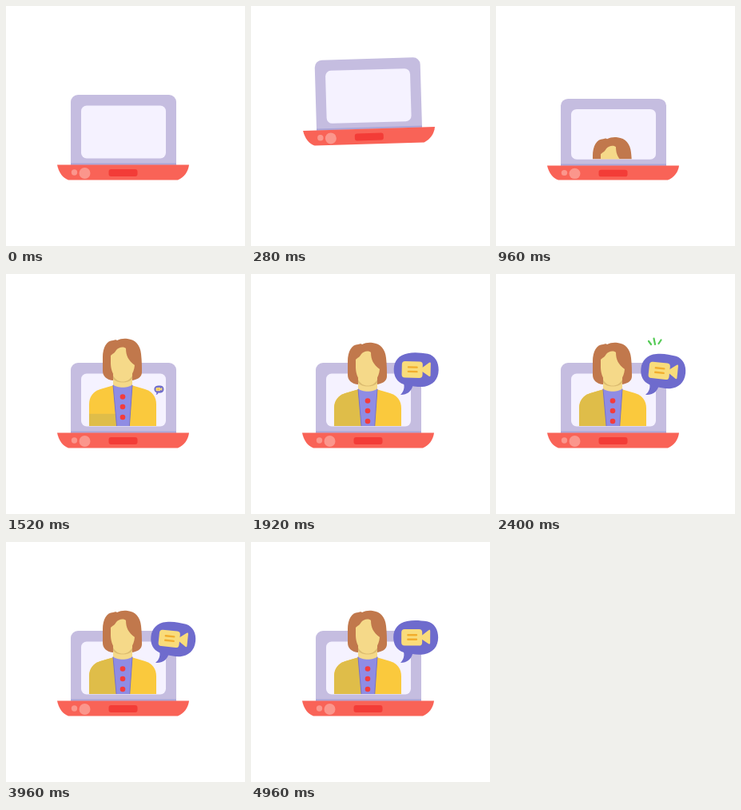
These frames come from a looping animation (299x300 px, 5 s). An HTML page with a canvas:

```html
<!DOCTYPE html>
<html lang="en">
<head>
<meta charset="utf-8">
<title>Video call</title>
<style>
html, body { margin: 0; width: 100%; height: 100%; overflow: hidden; background: #fff; }
canvas { display: block; }
</style>
</head>
<body>
<canvas id="stage" width="299" height="300"></canvas>
<script>
const ctx = document.getElementById('stage').getContext('2d');
const LOOP = 5000;
const GROUND = 218;
const TAIL = { x: 187.5, y: 151 };

// Smoothly interpolates between [time, value] keys.
function keyed(t, keys) {
  if (t <= keys[0][0]) return keys[0][1];
  for (let i = 1; i < keys.length; i++) {
    const [t0, v0] = keys[i - 1];
    const [t1, v1] = keys[i];
    if (t < t1) {
      const u = (t - t0) / (t1 - t0);
      return v0 + (v1 - v0) * u * u * (3 - 2 * u);
    }
  }
  return keys[keys.length - 1][1];
}

function fillPath(path, color) {
  ctx.fillStyle = color;
  ctx.fill(new Path2D(path));
}

function box(x, y, w, h, r, color) {
  ctx.fillStyle = color;
  ctx.beginPath();
  ctx.roundRect(x, y, w, h, r);
  ctx.fill();
}

function dot(x, y, r, color) {
  ctx.fillStyle = color;
  ctx.beginPath();
  ctx.arc(x, y, r, 0, Math.PI * 2);
  ctx.fill();
}

function drawLaptop(t, squash) {
  const lift = keyed(t, [[0, 0], [410, 59], [830, 0]]);
  const tilt = keyed(t, [[0, 0], [260, -1.7], [560, 0]]);
  ctx.save();
  ctx.translate(146, GROUND - lift);
  ctx.scale(1, squash);
  ctx.translate(0, -55);
  ctx.rotate(tilt * Math.PI / 180);
  ctx.translate(-146, 55 - GROUND);
  box(81, 111, 132, 88, [9, 9, 0, 0], '#c5bde0');
  box(81, 196.5, 132, 2, 0, '#aaa5d7');
  box(94, 124.5, 106, 66, 7, '#f5f2ff');
  fillPath('M64 198.5H229C228 207 223 214 215 217.5H78C71 215 66 208 64 198.5Z', '#f96357');
  box(128.5, 204, 36, 9, 3, '#f33c37');
  dot(85.5, 208, 3.7, '#fb968c');
  dot(98.5, 209, 7, '#fb968c');
  ctx.restore();
}

const JACKET = 'M104 200V168C104 158 109 152 118 149L135 144H157L174 149C183 152 188 158 188 168V200Z';

function drawPerson(t, squash) {
  if (t < 750) return;
  const drop = keyed(t, [[750, 106], [1400, -7], [1740, 0]]);
  const shadeTop = keyed(t, [[1400, 191], [1720, 140]]);
  const floor = GROUND - 28 * squash;
  ctx.save();
  ctx.beginPath();
  ctx.rect(90, 0, 120, floor);
  ctx.clip();

  ctx.translate(0, drop);
  fillPath('M139 88C143 86 147 85.5 152 86C162 87 168 94 169 105C170 114 170 121 170 128C170 134 164 137 158 138H133C126 137 121 133 121 126V109C121 97 126 88 134 88C137 87 138 87 139 88Z', '#c1784c');
  fillPath(JACKET, '#fac93d');

  ctx.save();
  ctx.clip(new Path2D(JACKET));
  box(100, shadeTop - drop, 39, 70, 0, '#dfbd49');
  ctx.restore();

  fillPath('M134 143L158 143L154 200H139Z', '#8f8ce4');
  ctx.strokeStyle = '#7672c8';
  ctx.lineWidth = 1;
  ctx.stroke(new Path2D('M134 144L139 200M158 144L154 200'));
  fillPath('M134 126H158V143C154 148 138 148 134 143Z', '#f5d989');
  fillPath('M134 132C139 142 153 142 158 132V136C153 142 139 142 134 136Z', '#dcbc70');
  fillPath('M131 107C134 104 136 104 138 100C141 97 146 95 150 98C150 107 153 113 161 119C160 130 154 138 146 138C137 138 131 128 131 116Z', '#f5d989');
  for (const y of [158.5, 171, 184]) dot(146, y, 3.3, '#f33c3c');
  ctx.restore();
}

function drawBubble(t) {
  const size = keyed(t, [[1400, 0], [1800, 1]]);
  if (size <= 0) return;
  const sway = 2.5 + 3.5 * Math.cos((t - 2400) / 1560 * Math.PI * 2);
  ctx.save();
  ctx.translate(TAIL.x, TAIL.y);
  ctx.rotate(sway * Math.PI / 180);
  ctx.scale(size, size);
  ctx.translate(-TAIL.x, -TAIL.y);
  fillPath('M195 99C203 97 212 98 220 99C229 101 234 109 234 119C234 131 227 138 217 140C211 141 206 140.5 202 140C200 147 195 151 187 151C191 147 192 142 191 138C182 135 178 128 178 119C178 109 184 101 195 99Z', '#6e6bcd');
  box(188, 109, 26, 20.5, 4, '#f9dc7b');
  fillPath('M213 117L222 110Q224 109 224 111V126Q224 128 222 127L213 121Z', '#f9dc7b');
  box(195, 115, 13, 2.4, 1.2, '#f2ad2d');
  box(195, 120.5, 13, 2.4, 1.2, '#f2ad2d');
  ctx.restore();
}

// Three short strokes shoot outward and vanish at their far ends.
function drawSparks(t) {
  if (t < 2000) return;
  const phase = t % 1000;
  const head = keyed(phase, [[80, 0], [300, 1]]);
  const tail = keyed(phase, [[430, 0], [700, 1]]);
  if (head <= tail) return;
  ctx.strokeStyle = '#54cb55';
  ctx.lineWidth = 2.2;
  ctx.lineCap = 'round';
  for (const [x0, y0, x1, y1] of [[194, 88, 191, 84], [199, 88, 197.5, 80.5], [203.5, 87, 206.5, 82.5]]) {
    ctx.beginPath();
    ctx.moveTo(x0 + (x1 - x0) * tail, y0 + (y1 - y0) * tail);
    ctx.lineTo(x0 + (x1 - x0) * head, y0 + (y1 - y0) * head);
    ctx.stroke();
  }
}

function render(now) {
  const t = now % LOOP;
  const squash = keyed(t, [[820, 1], [960, 0.953], [1190, 1]]);
  ctx.fillStyle = '#fff';
  ctx.fillRect(0, 0, 299, 300);
  drawLaptop(t, squash);
  drawPerson(t, squash);
  drawBubble(t);
  drawSparks(t);
}

let start;
function tick(now) {
  start ??= now;
  render(now - start);
  requestAnimationFrame(tick);
}
render(0);
requestAnimationFrame(tick);
</script>
</body>
</html>
```
